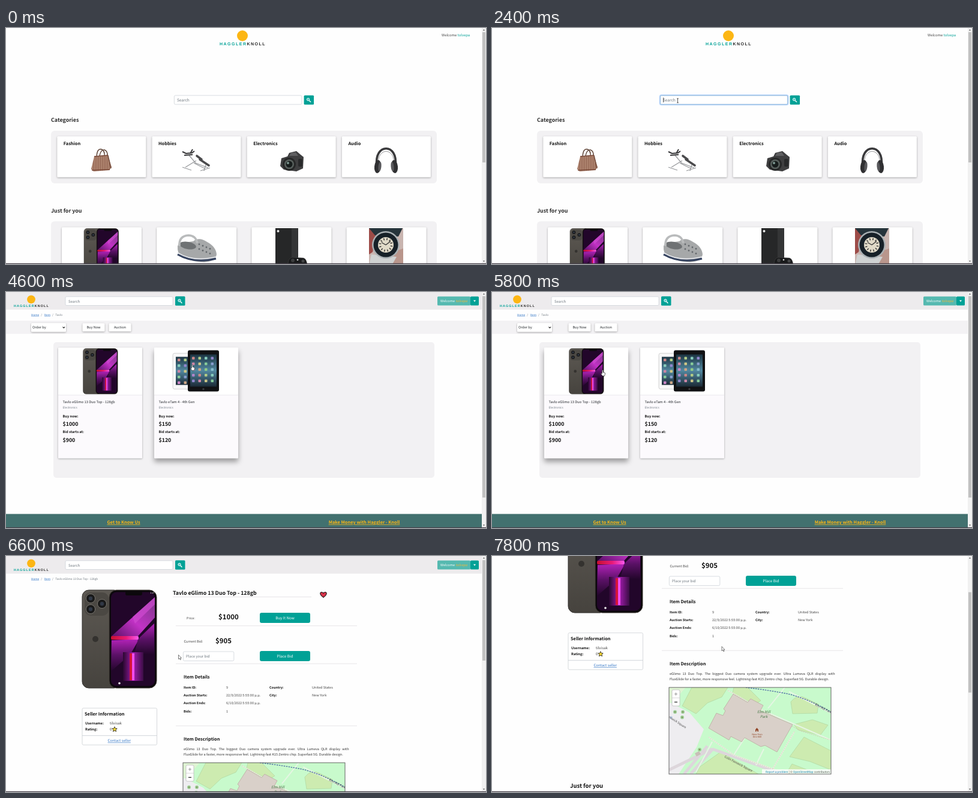
An HTML page that plays this animation: 800x395 px, repeating every 8000 ms.

```html
<!DOCTYPE html>
<html lang="en">
<head>
<meta charset="utf-8">
<title>Auction site walkthrough</title>
<style>
html, body { margin: 0; width: 100%; height: 100%; overflow: hidden; background: #fefefe; }
svg { display: block; width: 100vw; height: 100vh; }
text, .about { font-family: 'Noto Sans CJK JP', 'Noto Sans CJK SC', 'Noto Sans', sans-serif; text-rendering: geometricPrecision; white-space: pre; }
.b { font-weight: 700; }
.i { font-style: italic; }
.u { text-decoration: underline; }
.mark { font: 700 7px 'Liberation Sans', Arial, sans-serif; letter-spacing: 1.5px; }
.card { fill: #fff; filter: drop-shadow(0 1px 1.5px rgba(0,0,0,.32)); }
.card.lifted { filter: drop-shadow(0 6px 4px rgba(0,0,0,.36)); }
.about { font-size: 5.5px; line-height: 9px; color: #333; white-space: normal; }
.about div:first-child { text-align: justify; text-align-last: justify; }
.about div { white-space: nowrap; }
.about div:first-child { white-space: normal; }
</style>
</head>
<body>
<svg id="stage" viewBox="0 0 800 395" preserveAspectRatio="none"></svg>
<script>
const LOOP = 8000, STEP = 200;
const TEAL = '#00a196', INK = '#212529', GREY = '#6c757d', PANEL = '#f2f1f3', LINK = '#2f73c4', GOLD = '#fcb614';
const BRAND = 'Tavlo', USER = 'tolvepa', ITEM = 'Tavlo eGlimo 13 Duo Top - 128gb';

const text = (x, y, s, size, fill = INK, cls = '', more = '') =>
  `<text x="${x}" y="${y}" font-size="${size}" fill="${fill}" class="${cls}" ${more}>${s}</text>`;
const mid = (x, y, s, size, fill, cls) => text(x, y, s, size, fill, cls, 'text-anchor="middle"');
const rect = (x, y, w, h, fill, r = 0, more = '') =>
  `<rect x="${x}" y="${y}" width="${w}" height="${h}" rx="${r}" fill="${fill}" ${more}/>`;
const circle = (x, y, r, fill, more = '') => `<circle cx="${x}" cy="${y}" r="${r}" fill="${fill}" ${more}/>`;
const oval = (x, y, rx, ry, angle, fill) =>
  `<ellipse cx="${x}" cy="${y}" rx="${rx}" ry="${ry}" fill="${fill}" transform="rotate(${angle} ${x} ${y})"/>`;
const path = (d, fill, more = '') => `<path d="${d}" fill="${fill}" ${more}/>`;
const line = (d, stroke, w = 1, more = '') => path(d, 'none', `stroke="${stroke}" stroke-width="${w}" ${more}`);
const group = (x, y, body, k = 1) => `<g transform="translate(${x} ${y}) scale(${k})">${body}</g>`;
const field = (x, y, w, h) => rect(x, y, w, h, '#fff', 2, 'stroke="#ced4da" stroke-width=".8"');
const range = n => [...Array(n).keys()];

const defs = `<defs>
  <linearGradient id="back" x2="0" y2="1"><stop stop-color="#5d5953"/><stop offset="1" stop-color="#46433e"/></linearGradient>
  <linearGradient id="ray"><stop stop-color="#c8102e"/><stop offset=".55" stop-color="#e81a78"/><stop offset="1" stop-color="#f858ee"/></linearGradient>
  <linearGradient id="glow" x1="0" y1="1" x2="1" y2="0"><stop stop-color="#5c1168"/><stop offset=".45" stop-color="#c232c6"/><stop offset="1" stop-color="#7a3a86"/></linearGradient>
  <linearGradient id="dim" x2="0" y2="1"><stop stop-color="#b322b8"/><stop offset=".5" stop-color="#5a1166"/><stop offset="1" stop-color="#22062a"/></linearGradient>
  <linearGradient id="halo"><stop stop-color="#2a0830"/><stop offset=".5" stop-color="#a31cae"/><stop offset="1" stop-color="#3a0d44"/></linearGradient>
  <linearGradient id="tablet" x2="0" y2="1"><stop stop-color="#1c3442"/><stop offset=".5" stop-color="#5288a0"/><stop offset="1" stop-color="#1b2a36"/></linearGradient>
  <pattern id="weave" width="3" height="4" patternUnits="userSpaceOnUse">${rect(0, 0, 3, 4, '#b58c76')}${rect(0, 0, 1.2, 4, '#8c5d4c')}</pattern>
  <clipPath id="mapbox"><rect width="270" height="145"/></clipPath>
  <clipPath id="watchbox"><rect width="57" height="62"/></clipPath>
</defs>`;

const lens = (x, y) => circle(x, y, 7.6, '#191919', 'stroke="#77736c"') + circle(x, y, 3.2, '#303846');
const phone =
  rect(0, 0, 64, 164, 'url(#back)', 11, 'stroke="#33312e"') + rect(4, 4, 40, 39, '#4b4843', 10) +
  lens(14, 14) + lens(14, 32) + lens(33, 23) + circle(22, 82, 5, '#34322f') +
  rect(45, 0, 79, 164, '#0c080c', 12, 'stroke="#454039"') + rect(48, 3.5, 73, 157, '#22062a', 9) +
  path('M49 77L121 12V46L93 77Z', 'url(#glow)') + path('M84 45L121 12V24L88 56Z', '#d04ad2', 'opacity=".7"') +
  path('M49 84L95 82L80 108L48 136Z', 'url(#dim)') + path('M93 82L120 56V108L87 106Z', 'url(#dim)') +
  rect(68, 104, 34, 48, 'url(#halo)') +
  rect(48, 77, 46, 6, 'url(#ray)', 2) + rect(79, 106, 4, 45, '#d51438') + rect(83, 106, 4, 45, '#f04cee') +
  rect(72, 2, 28, 7, '#0c080c', 3);

const bag = line('M9 13Q10-1 17 1Q23 3 22 13M14 12Q16 1 22 2Q28 4 27 13', '#5c4033', 1.4) +
  path('M5 13L28 11L34 31L30 36L4 38L0 34Z', 'url(#weave)') +
  line('M5 13L28 11M1 36L31 35', '#7a4a39', 1.6) + line('M28 11L33 33', '#6b4435', 1.2);
const bench = line('M25 12L33 18M30 18L45 28', '#4a4a4c', 3.6, 'stroke-linecap="round"') +
  line('M12 11L23 24L44 32M24 20L6 31M40 27L37 37M1 31L16 36M31 37L47 32M20 24L38 33', '#96989b', 1.3) +
  line('M1 5L7 8L17 7L21 4M4 11L18 10M14 8L18 1', '#38383a', 2);
const camera = path('M2 12L12 9L15 3L27 0L34 6L39 10L38 29L27 34L6 31L0 25Z', '#3f3f40') +
  path('M15 8L18 3L26 2L30 8Z', '#606062') + circle(15, 22, 11, '#262727') + circle(15, 22, 8, '#58605d') +
  circle(15, 22, 5.5, '#171d1c') + circle(13, 20, 2, '#7d9890') + rect(30, 13, 7, 13, '#28292a', 2);
const headphones = line('M6 30C1 -9 42 -9 37 30', '#39393b', 3.6) + line('M9 28C5 -2 38 -2 34 28', '#8b8b8d', .9) +
  oval(7.5, 31, 5.5, 11, 6, '#303032') + oval(35.5, 31, 5.5, 11, -6, '#303032') +
  oval(11, 31, 2.5, 8, 6, '#58585b') + oval(32, 31, 2.5, 8, -6, '#58585b');
const clog = path('M2 20Q5 12 14 14L28 12Q38 4 51 13Q66 21 67 34Q65 46 46 47Q26 46 10 39Q1 34 2 20Z', '#a6a8a9') +
  oval(19, 19, 14, 6, 10, '#6f7274') + line('M5 20Q4 3 20 2Q32 2 35 15', '#b9bbbc', 3.6) +
  line('M2 31Q26 47 66 38', '#e6e8ed', 1.6) + line('M2 34Q30 50 66 41', '#34425f', 3) +
  range(8).map(i => circle(38 + i % 4 * 6, 17 + i % 4 * 2.5 + (i >> 2) * 8, 1.4, '#65696d')).join('');
const gameBox = rect(0, 0, 38, 65, '#262728') + rect(27, 0, 11, 65, '#343536') + circle(4.5, 5, 2, '#e8e8e8') +
  path('M21 65Q20 50 28 49L47 50Q53 52 53 65Z', '#191a1b', 'stroke="#444" stroke-width=".6"') +
  circle(29, 54, 3, '#3b3c3d') + circle(46, 55, 2.5, '#454647') + circle(37, 53, 1.3, '#ddd');
const watch = `<g clip-path="url(#watchbox)">` + rect(0, 0, 57, 62, '#c9b5b0') + path('M0 0H16L6 40L0 44Z', '#9d4c48') +
  path('M40 40L57 34V62H36Z', '#b9968c') + path('M0 0H56L49 14L10 12Z', '#26343b') + path('M4 44L46 48L38 62H0Z', '#cfd2d2') +
  circle(28, 28, 23, '#aab1b4') + circle(28, 28, 20.5, '#172128') + circle(28, 28, 13, '#e0dac8') +
  range(12).map(i => rect(27.3, 16.5, 1.4, 3.5, '#333', 0, `transform="rotate(${i * 30 + 12} 28 28)"`)).join('') +
  line('M28 28L21 24M28 28L36 22', '#333', 1.4) + '</g>';
const apps = (x, y, cols) => range(cols * 5).map(i =>
  rect(x + i % cols * 10.5, y + (i / cols | 0) * 9.5, 4.5, 4.5, `hsl(${i * 83 % 360} 40% 66%)`, 1)).join('');
const tablets = rect(0, 5, 35, 60, '#f7f7f7', 3, 'stroke="#bbb" stroke-width=".6"') + rect(5, 11, 28, 47, 'url(#tablet)') + apps(8, 14, 2) +
  rect(25, 0, 52, 69, '#111214', 3) + rect(29, 7, 44, 54, 'url(#tablet)') + apps(32, 11, 4) + circle(51, 65, 1.7, '#3b3c3f');

const logo = circle(38, 9, 9, GOLD) +
  `<text y="25" class="mark" fill="${TEAL}">HAGGLER<tspan fill="#252525">KNOLL</tspan></text>`;
const searchButton = (x, y) => rect(x, y, 16.5, 15.5, TEAL, 1.5) +
  circle(x + 7, y + 6.9, 2.2, '#55c6c4', 'stroke="#fff" stroke-width=".9"') + line(`M${x + 8.7} ${y + 8.7}l2.7 2.7`, '#fff', 1.4);

const categories = [['Fashion', bag, 142, 202], ['Hobbies', bench, 293, 202], ['Electronics', camera, 457, 206], ['Audio', headphones, 612, 201]];
const picks = [group(130, 335.5, phone, .465), group(284, 345, clog), group(449, 335, gameBox), group(605, 335, watch)];
const home = group(356, 4, logo) +
  text(726, 14, `Welcome <tspan fill="${TEAL}">${USER}</tspan>`, 5.9, '#444') +
  field(280.4, 112.9, 212.5, 15) +
  `<g id="focus">${rect(279.7, 112.2, 213.8, 16.4, 'none', 2.5, 'stroke="#c2dbfe" stroke-width="2"')}${rect(280.4, 112.9, 212.5, 15, 'none', 2, 'stroke="#79abd2" stroke-width=".8"')}</g>` +
  text(285, 123, 'Search', 6.5, GREY, '', 'id="query"') +
  line('M482.3 119.2l3.6 3.6m0-3.6l-3.6 3.6', '#14314f', 1.2, 'id="clear"') +
  rect(303, 116.5, .8, 8, '#222', 0, 'id="caret"') +
  searchButton(496.6, 112.7) +
  text(75, 157.3, 'Categories', 8.9, '#2b2b2b', 'b') + rect(75, 172, 643, 88, PANEL, 6) +
  categories.map(([name, art, x, y], i) => rect(85.3 + i * 158.2, 181.3, 148, 68.5, '#fff', 1.5, 'class="card"') +
    text(95.8 + i * 158.2, 195.5, name, 7.4, '#111', 'b') + group(x, y, art)).join('') +
  text(75, 309, 'Just for you', 8.9, '#2b2b2b', 'b') + rect(75, 323.5, 643, 90, PANEL, 6) +
  picks.map((art, i) => rect(93 + i * 158.2, 333.5, 133, 80, '#fff', 1.5, 'class="card"') + art).join('');

const header = rect(0, 0, 793, 29.5, '#edebed') + group(13, 5.5, logo, .763) +
  field(99, 7.8, 179, 14.7) + text(104, 17.6, 'Search', 6, GREY) + searchButton(282, 7.3) +
  rect(719, 7.5, 55, 15, '#55b9b0', 1.5) + rect(774, 7.5, 14, 15, TEAL, 1.5) + path('M779 13.8h4l-2 2.6z', '#fff') +
  text(724, 17.2, `Welcome <tspan class="i" fill="#f3b73a">${USER}</tspan>`, 5.6, '#fff');
const crumbs = last => text(42, 39.6, 'Home', 4.7, LINK, 'u') + text(58.3, 39.6, '/', 4.7, GREY) +
  text(64, 39.6, 'Item', 4.7, LINK, 'u') + text(77, 39.6, '/', 4.7, GREY) + text(82.3, 39.6, last, 4.7, GREY);

const offer = (x, name, buy, bid, art) => rect(x, 93, 140, 185.3, '#fff', 1, 'class="card offer"') +
  rect(x, 172, 140, 106.3, '#fcfafd', 1) + rect(x, 172, 140, .7, '#e6e4e8') + art +
  text(x + 7.5, 186.4, name, 5.75) + text(x + 7.5, 195, 'Electronics', 4.7, GREY) +
  text(x + 7.5, 209.7, 'Buy now:', 5.7, '#111', 'b') + text(x + 7.5, 224, buy, 8.8, '#111', 'b') +
  text(x + 7.5, 236.3, 'Bid starts at:', 5.7, '#111', 'b') + text(x + 7.5, 250.8, bid, 8.8, '#111', 'b');
const results = header + crumbs(BRAND) + rect(0, 48, 793, 22, '#f3f2f4') +
  rect(42, 52, 58, 14.7, '#fff', 1.5, 'class="card"') + text(44, 61.3, 'Order by', 5.6) + line('M94.5 58.3l1.8 1.8l1.8-1.8', '#222', 1.1) +
  rect(127.5, 52.3, 37, 13.7, '#fff', 1.5, 'class="card"') + mid(146, 61.3, 'Buy Now', 5.6) +
  rect(171.5, 52.3, 37, 13.7, '#fff', 1.5, 'class="card"') + mid(190, 61.3, 'Auction', 5.6) +
  rect(79, 84, 635, 227, PANEL, 5) +
  offer(87, ITEM, '$1000', '$900', group(128.5, 94.5, phone, .465)) +
  offer(247, 'Tavlo eTam 4 - 4th Gen', '$150', '$120', group(278, 97.5, tablets)) +
  rect(0, 371.5, 793, 24, '#42716f') + mid(196, 388, 'Get to Know Us', 7.4, GOLD, 'b u') +
  mid(597, 388, 'Make Money with Haggler - Knoll', 7.4, GOLD, 'b u');

const slanted = (x, y, a, s, size, fill) => `<g transform="translate(${x} ${y}) rotate(${a})">${text(0, 0, s, size, fill)}</g>`;
const grass = d => path(d, '#cdebb0', 'stroke="#afd6a0" stroke-width=".7"');
const tree = (x, y) => circle(x, y, 3, '#9ccf94') + circle(x, y, .9, '#75683f');
const map = `<g clip-path="url(#mapbox)">` + rect(0, 0, 270, 145, '#c8facc') +
  path('M0 24L34 42L58 70L46 100L16 145H0Z', '#eeedf0') + path('M0 0H28L12 18L0 27Z', '#dff4d3') +
  grass('M38 0H98L88 16L64 26L45 44L22 31Z') + grass('M108 0H131L153 22L143 28L106 10Z') +
  grass('M203 24Q214 10 228 18L249 28L247 43L206 44Z') + grass('M208 62L239 54L265 63L252 80L215 71Z') +
  grass('M225 83L270 106V138L235 124L201 116Z') + grass('M205 128L241 142L240 145H195Z') + grass('M51 133L86 108L149 145H45Z') +
  line('M0 138L72 103M25 145L64 98M72 103L190 145M36 145L73 103', '#ddd6db', 5) +
  line('M66 83L108 113L197 145M72 91L45 142M108 113L132 75M145 130L158 103M98 5L162 41L270 88M165 35L193 0M209 74L168 145M200 7L270 43', '#e6f5e4', 2) +
  line('M66 83L108 113L197 145M98 5L162 41L220 73L270 88M209 74L168 145', '#dba79e', .6, 'stroke-dasharray="2 1.5"') +
  path('M107 11L131 25L136 19L157 30L152 39L206 62L180 108L160 97L153 99L126 84L121 91L103 82L100 88L66 68L79 43L90 47L94 39L91 36Z', '#d9d0c9', 'stroke="#bcaaa0" stroke-width=".8"') +
  line('M128 0Q170 5 199 11Q232 19 270 41', '#4967a4', 1.3, 'stroke-dasharray="2.5 1.5"') +
  tree(10, 41) + tree(22, 50) + tree(23, 41) + tree(51, 104) + rect(44, 108, 8, 6, '#c8beb7', 0, 'transform="rotate(-28 48 111)"') +
  text(2, 53, 'P', 6, '#5c8fd3') +
  slanted(-3, 49, 33, 'arnwick Square', 5, '#444') + slanted(92, 117, 28, 'Colin Farnwick Square', 5, '#444') +
  slanted(243, 30, 27, 'Elm Mill Park', 5, '#444') +
  mid(158, 43, 'Elm Mill', 6, '#487848', 'i') + mid(158, 51, 'Park', 6, '#487848', 'i') +
  path('M144 74v-3.5l2.5-3l2.5 3v3.5h-1.6v-2h-1.8v2z', '#93482b') + mid(147, 79.5, 'New Fern', 4, '#93482b') + mid(147, 84, 'Elm Mill', 4, '#93482b') +
  rect(5, 4, 13, 27, '#fff', 2, 'stroke="#bbb" stroke-width=".8"') + rect(5, 17, 13, .7, '#ccc') +
  line('M9 11h5m-2.5-2.5v5', '#999', 1) + line('M9 24.5h5', '#222', 1.2) +
  rect(155, 137, 115, 8, '#fff', 0, 'opacity=".8"') +
  text(268, 142.8, `<tspan fill="#0078a8">Report a problem</tspan> | © <tspan fill="#0078a8">OpenStreetMap</tspan> contributors`, 4.6, '#444', '', 'text-anchor="end"') +
  '</g>' + rect(0, 0, 270, 145, 'none', 0, 'stroke="#555" stroke-width=".9"');

const row = (x, y, label, value, gap = 71) => text(x, y, label, 5.45, '#111', 'b') + text(x + gap, y, value, 5.6, '#444');
const rule = (x, y, w) => rect(x, y, w, .7, '#dedce0');
const button = (y, s) => rect(423, y, 84, 17, TEAL, 3) + mid(465, y + 10.8, s, 6.3, '#fff');
const about = `<div>eGlimo 13 Duo Top. The biggest Duo camera system upgrade ever. Ultra Lumeva QLR display with</div>` +
  `<div>FluxGlide for a faster, more responsive feel. Lightning-fast K15 Zentro chip. Superfast 5G. Durable design.</div>`;
const detail = header + crumbs(ITEM) + group(127, 57, phone) + circle(189, 213, 1.8, '#fff') + text(240, 63, '1 of', 4, '#fff') +
  text(278, 65.3, ITEM, 8.8, '#111', 'b') + rule(278, 68.3, 231) +
  path('M529 69.3C520 63 524.5 58 529 62C533.5 58 538 63 529 69.3Z', '#d9344a', 'stroke="#111" stroke-width="1.1"') +
  text(301, 105.8, 'Price:', 5.4, '#444') + text(354, 106, '$1000', 11.4, '#111', 'b') + button(95, 'Buy It Now') + rule(283, 116.5, 302) +
  text(296.5, 144.7, 'Current Bid:', 5.7, '#444') + text(349, 146, '$905', 11.4, '#111', 'b') +
  field(295.4, 160, 84.4, 15.5) + text(300, 170.4, 'Place your bid', 6, GREY) + button(159, 'Place Bid') + rule(283, 179.8, 302) +
  text(296, 204.5, 'Item Details', 7.4, '#111', 'b') +
  row(296, 221.5, 'Item ID:', '9') + row(296, 234.8, 'Auction Starts:', '22/9/2022 5:55:00 μ.μ.') +
  row(296, 248.3, 'Auction Ends:', '6/10/2022 5:55:00 μ.μ.') + row(296, 261.8, 'Bids:', '1') +
  row(439, 221.5, 'Country:', 'United States') + row(439, 234.8, 'City:', 'New York') +
  rect(127, 254.7, 124.5, 61.5, '#fff', 2, 'stroke="#ccd0d4" stroke-width=".8"') +
  text(131, 267, 'Seller Information', 7.4, '#111', 'b') +
  text(132, 282, 'Username:', 5.75, '#111', 'b') + text(173, 282, 'tilvisak', 6, '#444') +
  text(132, 292.2, 'Rating:', 5.75, '#111', 'b') + text(173, 292.2, '0', 6, '#444') +
  path('M181 285.7l1.2 2.8 3 .3-2.2 2 .6 3-2.6-1.6-2.6 1.6.6-3-2.2-2 3-.3z', '#f5d431', 'stroke="#222" stroke-width=".8"') +
  rect(127, 300.3, 124.5, .8, '#c6ccd2') + mid(188.7, 311, 'Contact seller', 6, LINK, 'u') +
  rule(283, 283.8, 302) + text(296, 308.7, 'Item Description', 7.4, '#111', 'b') +
  `<foreignObject x="296" y="319.3" width="275.5" height="22"><div class="about">${about}</div></foreignObject>` +
  group(295, 346, map) + text(130, 513.8, 'Just for you', 9.5, '#111', 'b');

const frameBars = rect(793, 0, 7, 395, '#f1f1f1') + rect(794, 7, 5, 218, '#c1c1c1', 0, 'id="thumb"') +
  path('M794.8 4.3h3.4l-1.7-2zM794.8 389.5h3.4l-1.7 2z', '#555') + rect(0, 393.8, 800, 1.2, '#48424b');
const pointers = {
  arrow: path('M0 0V7.2L1.7 5.7L2.9 8.3L4 7.8L2.9 5.3H5Z', '#fff', 'stroke="#444" stroke-width=".7"'),
  ibeam: line('M-1.5-3.5h3M0-3.5v7M-1.5 3.5h3', '#333', .8),
  hand: path('M0-4Q1-5 1.7-4V-.5L4.5.2Q5.4.6 5 2L4 5.5H.5L-2 1.8Q-2 .5-.2 1.6Z', '#fff', 'stroke="#222" stroke-width=".7"')
};

document.getElementById('stage').innerHTML = defs + rect(0, 0, 800, 395, '#fefefe') +
  `<g id="home">${home}</g><g id="results">${results}</g><g id="detail">${detail}</g>` + frameBars +
  `<g id="pointer">${Object.entries(pointers).map(([k, v]) => `<g id="${k}">${v}</g>`).join('')}</g>`;

// time, x, y, pointer shape
const moves = [
  [200, 560, 380, 'arrow'], [600, 430, 290, 'arrow'], [1000, 325, 185, 'arrow'], [1400, 291, 143, 'arrow'],
  [1800, 306, 123, 'ibeam'], [2000, 309.5, 121.5, 'ibeam'], [4200, 309.5, 126, 'hand'], [5000, 309.5, 126, 'hand'],
  [5800, 183.5, 135, 'hand'], [6200, 183.5, 135, 'arrow'], [6600, 287.5, 165.5, 'arrow'], [7400, 383, 151.5, 'arrow'], [8000, 383, 151.5, 'arrow']
];
const pages = [[0, 'home'], [4200, 'results'], [6200, 'detail']];
const thumbs = { home: 218, results: 337, detail: 168 };
const el = id => document.getElementById(id);
const show = (id, on) => { el(id).style.display = on ? '' : 'none'; };
const latest = (table, t) => table.filter(r => r[0] <= t).pop();

function render(t) {
  const page = latest(pages, t)[1];
  pages.forEach(([, name]) => show(name, name === page));

  const typed = BRAND.slice(0, Math.max(0, Math.min(5, (t - 2800) / STEP)));
  const focused = t >= 2000;
  el('query').textContent = typed || 'Search';
  el('query').setAttribute('fill', typed ? '#444' : GREY);
  show('focus', focused);
  show('clear', typed);
  show('caret', focused && (typed || Math.floor((t - 2000) / 500) % 2 === 0));
  el('caret').setAttribute('x', 285.3 + (typed && page === 'home' ? el('query').getComputedTextLength() : 0));

  const scroll = t >= 7800 ? 126 : t >= 7600 ? 63 : 0;
  el('detail').setAttribute('transform', `translate(0 ${-scroll})`);
  el('thumb').setAttribute('y', 7 + scroll * .425);
  el('thumb').setAttribute('height', thumbs[page]);

  const from = latest(moves, t);
  show('pointer', from);
  if (!from) return;
  const to = moves[moves.indexOf(from) + 1];
  const held = from[3] === 'ibeam' && to[3] === 'hand';
  const k = held ? 0 : (t - from[0]) / (to[0] - from[0]);
  const [x, y] = [1, 2].map(i => from[i] + (to[i] - from[i]) * k);
  el('pointer').setAttribute('transform', `translate(${x} ${y})`);
  Object.keys(pointers).forEach(name => show(name, name === from[3]));
  document.querySelectorAll('.offer').forEach((card, i) => {
    const left = 87 + i * 160;
    card.classList.toggle('lifted', x > left && x < left + 140);
  });
}

const start = performance.now();
function tick() {
  const t = (performance.now() - start) % LOOP;
  render(Math.floor(t / STEP) * STEP);
  requestAnimationFrame(tick);
}
tick();
</script>
</body>
</html>
```
